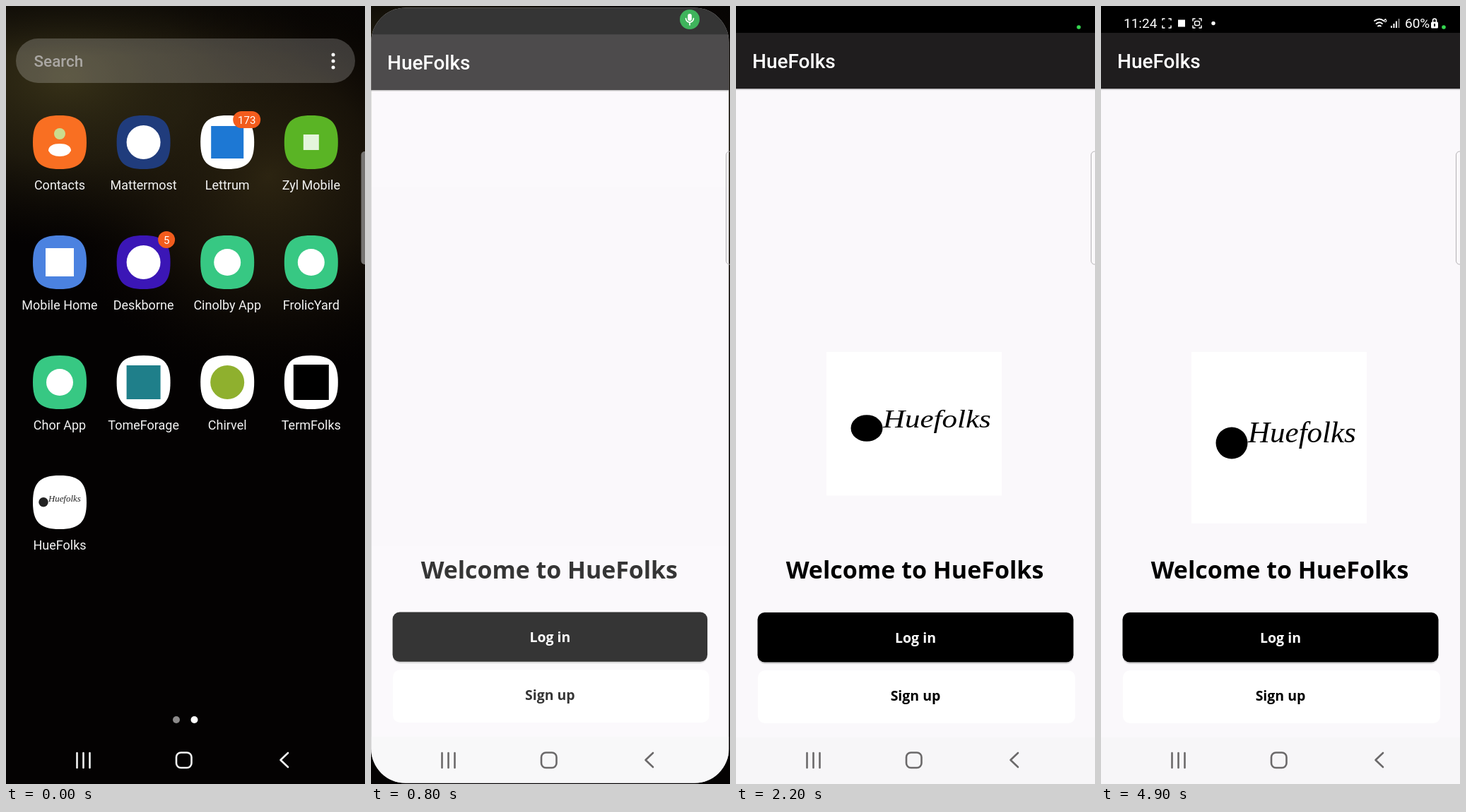
These frames come from a looping animation (508 by 1102 pixels, 5000 ms). An HTML page:

```html
<!DOCTYPE html>
<html lang="en">
<head>
<meta charset="utf-8">
<title>App launch</title>
<style>
  html, body { margin: 0; width: 100%; height: 100%; overflow: hidden; background: #000; }
  svg { display: block; width: 508px; height: 1102px; }
  text { font-family: Roboto, sans-serif; white-space: pre; }
  .mid { text-anchor: middle; }
  .label { font-size: 18px; fill: #f4f4f4; }
  .badge { font-size: 15px; fill: #fff; }
  .bold { font-family: "Open Sans", "Noto Sans", sans-serif; font-weight: 700; }
  .script { font-family: "Liberation Serif", serif; font-style: italic; }
  .line { fill: none; stroke: #fff; stroke-linecap: round; stroke-linejoin: round; }
</style>
</head>
<body>
<svg viewBox="0 0 508 1102">
  <defs>
    <radialGradient id="glowA" gradientUnits="userSpaceOnUse" cx="0" cy="0" r="1"
      gradientTransform="translate(85 100) scale(360 240)">
      <stop offset="0" stop-color="#373118"/>
      <stop offset=".5" stop-color="#2c2613" stop-opacity=".65"/>
      <stop offset="1" stop-color="#1c160a" stop-opacity="0"/>
    </radialGradient>
    <radialGradient id="glowB" gradientUnits="userSpaceOnUse" cx="0" cy="0" r="1"
      gradientTransform="translate(370 240) scale(300 290)">
      <stop offset="0" stop-color="#2c2411"/>
      <stop offset=".5" stop-color="#20190c" stop-opacity=".7"/>
      <stop offset="1" stop-color="#100a04" stop-opacity="0"/>
    </radialGradient>
    <linearGradient id="shade" x1="0" y1="0" x2="0" y2="1">
      <stop offset="0" stop-color="#080604" stop-opacity=".6"/>
      <stop offset="1" stop-color="#080604" stop-opacity="0"/>
    </linearGradient>
    <clipPath id="winClip"><rect id="winShape" width="508" height="1102"/></clipPath>
    <path id="tile" d="M0-38C28-38 38-28 38 0S28 38 0 38-38 28-38 0-28-38 0-38Z"/>
    <g id="brand">
      <circle cx="185" cy="619" r="22.5"/>
      <text class="script" x="208" y="618" font-size="43">Huefolks</text>
    </g>
  </defs>

  <rect width="508" height="1102" fill="#040202"/>
  <rect width="508" height="600" fill="url(#glowB)"/>
  <rect width="508" height="400" fill="url(#glowA)"/>
  <rect width="508" height="70" fill="url(#shade)"/>

  <g id="home">
    <rect id="bar" x="14" y="46" width="480" height="63" rx="31.5" fill="#fff" fill-opacity=".2"/>
    <g id="hints">
      <text x="39.5" y="86" font-size="22.5" font-weight="500" fill="#aaa7a3">Search</text>
      <g fill="#fff">
        <circle cx="463" cy="69" r="2.5"/><circle cx="463" cy="78" r="2.5"/><circle cx="463" cy="87" r="2.5"/>
        <circle cx="266.5" cy="1011" r="5"/>
      </g>
      <circle cx="241" cy="1011" r="5" fill="#8c8a8a"/>
    </g>
    <g id="apps"></g>
  </g>

  <g id="win" clip-path="url(#winClip)">
    <rect width="508" height="1102" fill="#fdfcfd"/>
    <g id="splash">
      <rect x="222" y="519" width="64" height="64" rx="2" fill="#fff" stroke="#444" stroke-width="2.5"/>
      <use href="#brand" transform="translate(190.5 406) scale(.242)" fill="#555"/>
    </g>
    <g id="page">
      <rect width="508" height="1102" fill="#faf8fb"/>
      <rect width="508" height="39"/>
      <rect y="38" width="508" height="79.5" fill="#1f1d1e"/>
      <rect y="117" width="508" height="1.5" fill="#b9b7b9"/>
      <text x="23" y="88" font-size="28" font-weight="500" fill="#fff">HueFolks</text>
      <g id="logo">
        <rect x="128" y="490" width="248" height="243" fill="#fff"/>
        <use href="#brand"/>
      </g>
      <text class="bold mid" x="253" y="811" font-size="34">Welcome to HueFolks</text>
      <rect x="31" y="862" width="446" height="70" rx="10" fill="#d6d4d7"/>
      <rect x="30.5" y="859" width="447" height="70.5" rx="10"/>
      <text class="bold mid" x="254" y="902" font-size="19.5" fill="#fff">Log in</text>
      <rect x="31" y="941" width="449" height="75" rx="10" fill="#fff"/>
      <text class="bold mid" x="254" y="984" font-size="19.5">Sign up</text>
      <rect y="1036" width="508" height="66" fill="#f7f6f8"/>
    </g>
  </g>

  <rect id="handle" x="502.5" y="206" width="12" height="160" rx="5"/>
  <g id="nav" class="line" stroke-width="2.6">
    <path d="M100.5 1058v21M109.5 1058v21M118.5 1058v21"/>
    <rect x="241" y="1057.5" width="21.5" height="21.5" rx="6.5"/>
    <path d="M399 1058l-10.5 10 10.5 10"/>
  </g>

  <g id="status" fill="#fff">
    <text x="32" y="31" font-size="19">11:24</text>
    <path class="line" stroke-width="1.5" d="M87 20v-2h3M96 18h3v2M99 28v3h-3M90 31h-3v-3"/>
    <rect x="109" y="19.5" width="10" height="10"/>
    <path class="line" stroke-width="1.5" d="M130 21v-3h3M139 18h3v3M142 28v3h-3M133 31h-3v-3"/>
    <rect class="line" x="132.5" y="21.5" width="7" height="6" rx="2" stroke-width="1.5"/>
    <circle cx="159" cy="24.5" r="2.7"/>
    <path class="line" stroke-width="1.8" d="M387 21q7-5 13 0M389.5 25q4.5-3.5 8.5 0M392 28.5q2-1.5 4 0"/>
    <text x="400" y="23" font-size="8" font-weight="700">6</text>
    <path d="M410 28h2v3h-2zM413.5 25h2v6h-2zM417 21.5h2v9.5h-2z"/>
    <path d="M420.5 18h2v13h-2z" opacity=".5"/>
    <text x="430" y="31" font-size="19">60%</text>
    <path class="line" stroke-width="1.6" d="M469.5 23v-2.5a2.5 2.5 0 0 1 5 0V23"/>
    <rect x="467" y="22.5" width="10" height="9" rx="1.5"/>
    <rect x="471" y="25" width="2" height="4" fill="#000"/>
  </g>

  <g id="chip">
    <circle id="disc" r="14"/>
    <g id="mic">
      <rect x="-2.8" y="-8" width="5.6" height="10" rx="2.8" fill="#fff"/>
      <path class="line" stroke-width="1.6" d="M-5.5-1.5a5.5 5.5 0 0 0 11 0M0 4v4"/>
    </g>
  </g>
</svg>

<script>
const LOOP = 5000, STEP = 100;
const $ = id => document.getElementById(id);
const set = (id, attrs) => { for (const k in attrs) $(id).setAttribute(k, attrs[k]); };
const clamp = v => Math.min(1, Math.max(0, v));
const ramp = (t, from, to) => clamp((t - from) / (to - from));
const mix = (a, b, p) => a + (b - a) * p;

const dot = (r, fill) => `<circle r="${r}" fill="${fill}"/>`;
const square = (s, fill) => `<rect x="${-s / 2}" y="${-s / 2}" width="${s}" height="${s}" fill="${fill}"/>`;
const person = '<path d="M-16 12C-16 5-9 2 0 2S16 5 16 12Q12 20 0 20T-16 12Z" fill="#fff"/>' +
  '<circle cy="-12" r="8" fill="#cbdc8e"/>';
const brandIcon = '<use href="#brand" transform="translate(-78.5 -186) scale(.3)" fill="#222"/>';

// label, tile colour, inner shape, badge
const apps = [
  ['Contacts', '#f96f22', person],
  ['Mattermost', '#203c7c', dot(24, '#fff')],
  ['Lettrum', '#fff', square(46, '#1d78d4'), '173'],
  ['Zyl Mobile', '#5ab425', square(22, '#e4f5dc')],
  ['Mobile Home', '#4b82e0', square(40, '#fff')],
  ['Deskborne', '#3b16b6', dot(24, '#fff'), '5'],
  ['Cinolby App', '#37c883', dot(19, '#fff')],
  ['FrolicYard', '#37c883', dot(19, '#fff')],
  ['Chor App', '#37c883', dot(19, '#fff')],
  ['TomeForage', '#fff', square(48, '#1f7f8a')],
  ['Chirvel', '#fff', dot(24, '#8fb02e')],
  ['TermFolks', '#fff', square(50, '#000')],
  ['HueFolks', '#fff', brandIcon]
];

function badge(text) {
  const [w, x] = text.length > 1 ? [39, 27.5] : [24, 32.5];
  return `<g transform="translate(${x} -32)"><rect x="${-w / 2}" y="-12" width="${w}" height="24" rx="12"
    fill="#f25c1d"/><text class="badge mid" y="5.5">${text}</text></g>`;
}

$('apps').innerHTML = apps.map(([name, color, art, count], i) => {
  const x = 76 + (i % 4) * 118.6, y = 193 + Math.floor(i / 4) * 170;
  return `<g transform="translate(${x} ${y})"><use href="#tile" fill="${color}"/>${art}
    ${count ? badge(count) : ''}<text class="label mid" y="66.5">${name}</text></g>`;
}).join('');

function draw(t) {
  // the window grows out of the last icon
  const left = 1 - ramp(t, 497, 901), p = 1 - left ** 4;
  const scale = mix(.15, 1, p), cx = mix(76, 254, p), cy = mix(693, 551, p);
  const h = mix(508, 1102, clamp(p * 1.6));
  set('win', {
    transform: `translate(${cx - 254 * scale} ${cy - 551 * scale}) scale(${scale})`,
    opacity: ramp(t, 480, 540)
  });
  set('winShape', { y: 551 - h / 2, height: h, rx: 196 * left });

  const zoom = 1 - .046 * p;
  set('home', {
    transform: `translate(254 551) scale(${zoom}) translate(-254 -551)`,
    opacity: 1 - .62 * p
  });
  set('bar', { opacity: 1 - .4 * p });
  set('hints', { opacity: clamp(1 - 2 * p) });

  set('splash', { opacity: 1 - ramp(t, 620, 760) });
  set('page', { opacity: ramp(t, 640, 842) });

  // the logo unrolls downward from its top edge
  const rise = (1 - Math.cos(Math.PI * ramp(t, 810, 2700))) / 2;
  set('logo', { transform: `translate(0 490) scale(1 ${rise}) translate(0 -490)`, opacity: rise > .01 ? 1 : 0 });

  const inApp = p > .85;
  set('nav', { style: `stroke:${inApp ? '#6b696a' : '#f4f4f4'}` });
  set('handle', inApp
    ? { fill: 'none', stroke: '#b3b1b3' }
    : { fill: '#777573', stroke: 'none' });

  // the microphone chip shrinks into the privacy dot
  const s = ramp(t, 1880, 2150), grow = ramp(t, 100, 300);
  set('chip', {
    transform: `translate(${mix(451, 485, s)} ${mix(19, 30, s)}) scale(${mix(1, .2, s) * mix(.4, 1, grow)})`,
    opacity: grow
  });
  set('disc', { fill: s === 1 ? '#35d850' : '#3fb45c' });
  set('mic', { opacity: 1 - ramp(s, 0, .4) });
  set('status', { opacity: ramp(t, 2200, 2400) });
}

const start = performance.now();
function tick() {
  const t = (performance.now() - start) % LOOP;
  draw(Math.floor(t / STEP) * STEP);
  requestAnimationFrame(tick);
}
tick();
</script>
</body>
</html>
```
